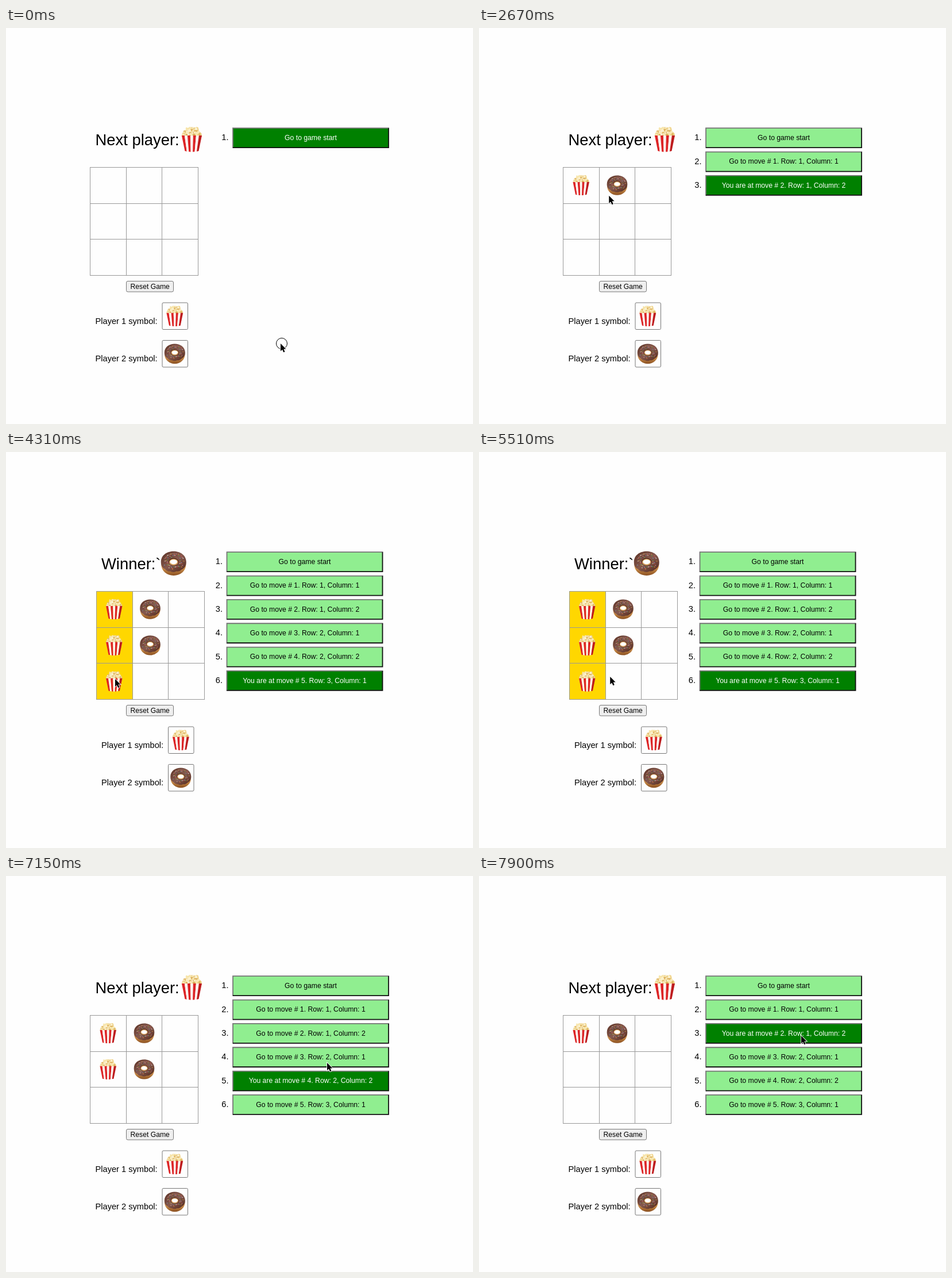
An HTML page that plays this animation: 813x689 px, repeating every 8 s.

```html
<!DOCTYPE html>
<html lang="en">
<head>
<meta charset="utf-8">
<title>Tic-tac-toe</title>
<style>
html, body { margin: 0; width: 100%; height: 100%; overflow: hidden; background: #fefefe; }
svg { display: block; font: 14.63px "Liberation Sans", Arial, sans-serif; }
.title { font-size: 27.4px; }
.button { font-size: 12.19px; text-anchor: middle; }
.crisp { shape-rendering: crispEdges; }
</style>
</head>
<body>
<svg width="813" height="689" viewBox="0 0 813 689">
  <defs>
    <linearGradient id="icing" x1="0" y1="0" x2="1" y2="1">
      <stop offset="0" stop-color="#5a3023"/>
      <stop offset=".5" stop-color="#85594e"/>
      <stop offset="1" stop-color="#50271b"/>
    </linearGradient>
    <linearGradient id="dough" x1="0" y1="0" x2="0" y2="1">
      <stop offset=".6" stop-color="#d79a52"/>
      <stop offset="1" stop-color="#8a4f20"/>
    </linearGradient>
    <g id="popcorn"></g>
    <g id="donut"></g>
  </defs>
  <g id="scene"></g>
  <g id="cursor">
    <circle id="ring" cx="2" r="9.5" fill="none" stroke="#000"/>
    <path d="M0 0V13.2L3 10.4L5.2 15.3L7.5 14.3L5.4 9.5H9.4Z" stroke="#fff" stroke-width="1.6" paint-order="stroke"/>
  </g>
</svg>
<script>
const LOOP = 8000, TICK = 145;
const CELLS = [0, 1, 3, 4, 6];
// mouse down, mouse up, move shown afterwards
const CLICKS = [[0, 150, 0], [1330, 1480, 1], [2230, 2370, 2], [3120, 3260, 3], [3710, 3860, 4],
  [4160, 4310, 5], [6250, 6400, 4], [7300, 7450, 3], [7750, 7900, 2]];
// start, number of ticks, destination
const GLIDES = [[150, 5, 198, 283], [1630, 1, 240, 275], [2670, 3, 187, 340], [3410, 2, 226, 351],
  [4010, 1, 190, 395], [5510, 5, 558, 357], [6850, 3, 559, 325], [7600, 1, 561, 278]];

const $ = id => document.getElementById(id);
const range = (n, f) => Array.from({ length: n }, (_, i) => f(i)).join('');
const text = (x, y, s, attrs = '') => `<text x="${x}" y="${y}" ${attrs}>${s}</text>`;
const symbol = (id, x, y, k = 1) => `<use href="#${id}" transform="translate(${x} ${y}) scale(${k})"/>`;
const box = (x, y, w, h, fill, r) =>
  `<rect x="${x}" y="${y}" width="${w}" height="${h}" rx="${r}" fill="${fill}" stroke="#767676"/>`;

function random(seed) {
  return () => (seed = seed * 16807 % 2147483647) / 2147483647;
}

function popcornArt() {
  const rnd = random(77);
  const kernels = range(70, i => {
    const y = -18 + i / 69 * 12, spread = 9 + (y + 18) * .68;
    const x = (rnd() * 2 - 1) * spread;
    const fill = ['#f8e7b0', '#fbf1cf', '#efd287', '#dcb05c'][Math.floor(rnd() * 4)];
    return `<circle cx="${x}" cy="${y - 1}" r="${1.4 + rnd() * 1.5}" fill="${fill}"/>`;
  });
  const top = i => -17.5 + i * 5, bottom = i => -12 + i * 24 / 7;
  const stripes = range(7, i => {
    const dip = j => 22 - (j - 3.5) ** 2 * .13;
    return `<path d="M${top(i)} -6.5L${top(i + 1)} -6.5L${bottom(i + 1)} ${dip(i + 1)}L${bottom(i)} ${dip(i)}Z"
      fill="${i % 2 ? '#fbf6f1' : '#dd2426'}"/>`;
  });
  return `<path d="M-17 -4Q-19 -11 -11 -15Q-6 -22 1 -21Q9 -21 12 -14Q19 -11 17 -4Z" fill="#ecd08a"/>${kernels}${stripes}
    <path d="M13 -6.5H17.5L12 20.4L9 21Z" fill="#7d0d10" opacity=".35"/>`;
}

function donutArt() {
  const rnd = random(31);
  const colors = ['#e0574f', '#58b05a', '#e8e0d8', '#6fa6c9', '#e3a54b', '#d592a5'];
  const sprinkles = range(44, i => {
    const a = i * 2.4, k = .5 + rnd() * .42;
    return `<rect x="${20 * k * Math.cos(a)}" y="${-3 + 16.5 * k * Math.sin(a)}" width="2" height="1.1"
      fill="${colors[i % 6]}" opacity=".85"/>`;
  });
  return `<ellipse cy="2.5" rx="21.5" ry="19" fill="url(#dough)"/>
    <path d="M-22 -2C-22 -27 22 -27 22 -2C22 6 18 9 14 11Q10 15 5 14Q-1 17 -6 14Q-11 15 -15 10C-20 8 -22 4 -22 -2Z" fill="url(#icing)"/>
    <path d="M-16 -7Q-10 -17 3 -17" fill="none" stroke="#a88578" stroke-width="2" opacity=".5"/>
    ${sprinkles}
    <ellipse cy="-2.5" rx="8.6" ry="6.4" fill="#4b2418"/>
    <ellipse cy="-2" rx="7.8" ry="5.7" fill="#d9a462"/>
    <ellipse cy="-2.3" rx="6.2" ry="4" fill="#fefefe"/>`;
}

function listRow(i, current, pressed) {
  const y = 173.4 + i * 41.35, w = 271, h = 34, active = i === current;
  const place = CELLS[i - 1];
  const label = i === 0 ? 'Go to game start'
    : `${active ? 'You are at' : 'Go to'} move # ${i}. Row: ${Math.floor(place / 3) + 1}, Column: ${place % 3 + 1}`;
  const [light, dark] = pressed ? ['#111', '#767676'] : ['#767676', '#111'];
  return text(387.5, y + 22, `${i + 1}.`, 'text-anchor="end"') +
    `<g transform="translate(395 ${y + .8})" fill="none" stroke-width="1.8">
      <rect width="${w}" height="${h}" fill="${active ? 'green' : '#90ee90'}"/>
      <path d="M0 ${h + .9}V0H${w + .9}" stroke="${light}"/>
      <path d="M${w} 0V${h}H0" stroke="${dark}"/></g>` +
    text(530.5, y + 21.6, label, `class="button" fill="${active ? '#fff' : '#000'}"`);
}

function scene(current, count, pressed) {
  const won = current === 5, shift = won ? 10.5 : 0;
  const turn = current % 2 ? 'donut' : 'popcorn';
  const edge = i => Math.round(i * 62.7);
  const wins = won ? '<rect x="146.5" y="242.5" width="63" height="188" fill="gold"/>' : '';
  const lines = range(4, i => `M146 ${242.5 + edge(i)}h189M${146.5 + edge(i)} 242v189`);
  const marks = range(current, i => {
    const c = CELLS[i];
    return symbol(i % 2 ? 'donut' : 'popcorn', 177.7 + c % 3 * 62.8, 273.3 + Math.floor(c / 3) * 62.8, .81);
  });
  const players = range(2, i => {
    const y = 478 + i * 65.5;
    return text(155.5, y + 36.5, `Player ${i + 1} symbol:`) + box(272, y, 44.5, 46.5, '#fefefe', 2) +
      symbol(i ? 'donut' : 'popcorn', 293.8, y + 23, .82);
  });
  return `<g transform="translate(${shift} 0)">
      ${text(155.5, 204, won ? 'Winner:`' : 'Next player:', 'class="title"')}
      ${symbol(turn, won ? 281.3 : 323.4, 193.5)}
      <g class="crisp">${wins}<path d="${lines}" stroke="#999"/></g>${marks}${players}
    </g>
    ${box(209.5, 440.5, 82, 18.5, '#efefef', 2.5)}${text(250.7, 454, 'Reset Game', 'class="button"')}
    <g transform="translate(${-shift} 0)">${range(count + 1, i => listRow(i, current, i === pressed))}</g>`;
}

function pointer(t) {
  let x = 478, y = 549;
  for (const [start, ticks, toX, toY] of GLIDES) {
    if (t < start) break;
    const p = Math.min(1, (Math.floor((t - start) / TICK) + 1) / ticks);
    const ease = p * p * (3 - 2 * p);
    x += (toX - x) * ease;
    y += (toY - y) * ease;
  }
  return [x, y];
}

let shown;
function draw(now) {
  const t = now % LOOP;
  const [x, y] = pointer(t);
  const down = CLICKS.some(([from, to]) => t >= from && t < to);
  const past = CLICKS.filter(c => t >= c[1]).map(c => c[2]);
  const current = past.length ? past[past.length - 1] : 0;
  const pressed = down && x > 384 ? Math.floor((y - 173) / 41.35) : -1;
  const state = [current, Math.max(0, ...past), pressed];
  if (String(state) !== shown) {
    shown = String(state);
    $('scene').innerHTML = scene(...state);
  }
  $('cursor').setAttribute('transform', `translate(${x} ${y})`);
  $('ring').style.display = down ? '' : 'none';
}

$('popcorn').innerHTML = popcornArt();
$('donut').innerHTML = donutArt();
const begin = performance.now();
function tick() {
  draw(performance.now() - begin);
  requestAnimationFrame(tick);
}
tick();
</script>
</body>
</html>
```
